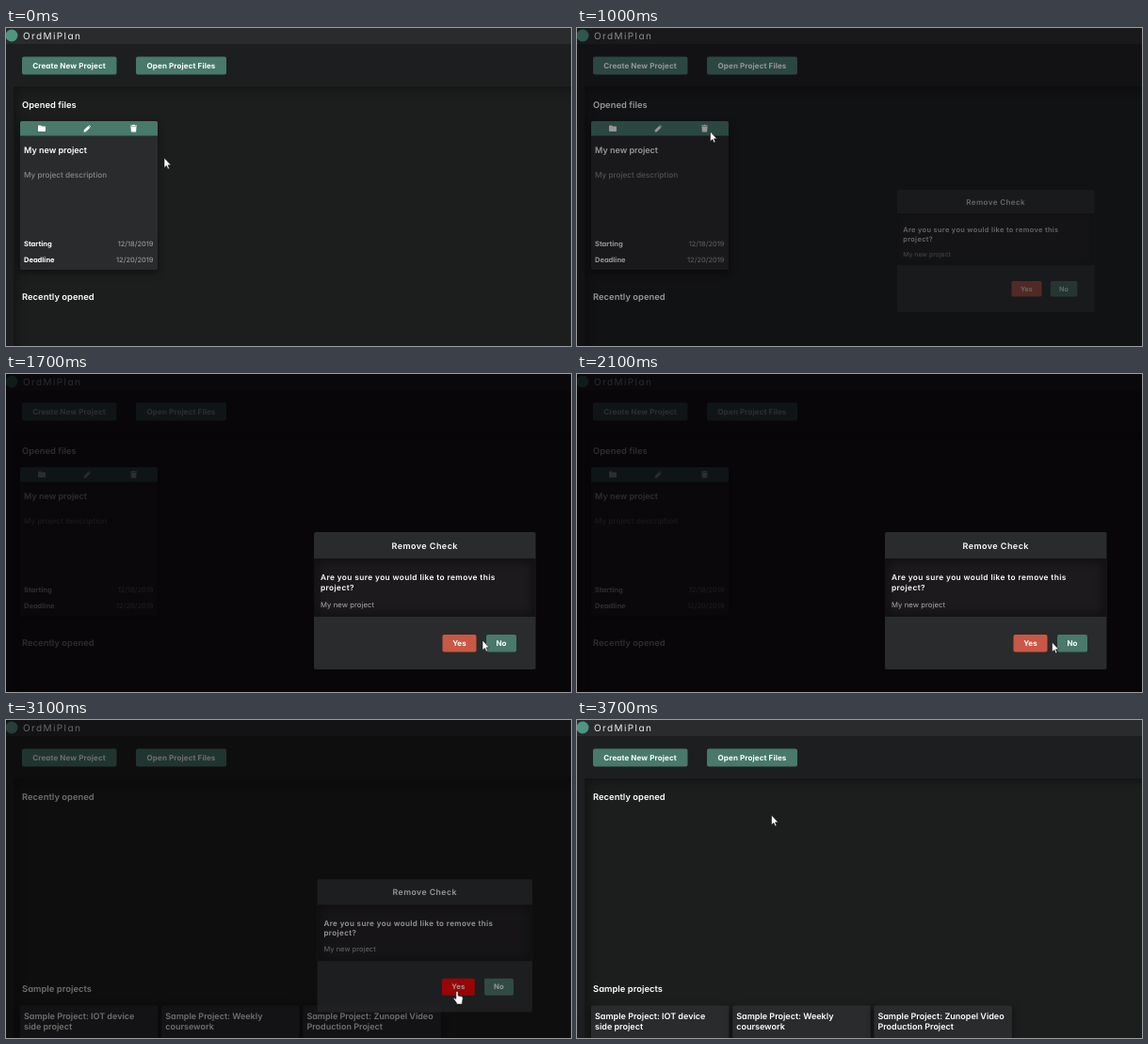
Write an HTML page that moves like this. It is 600 by 338 pixels and loops after 3800 ms.

```html
<!DOCTYPE html>
<html lang="en">
<head>
<meta charset="utf-8">
<title>Project board</title>
<style>
  html, body { margin: 0; width: 100%; height: 100%; overflow: hidden; background: #1d1e1f; }
  #stage { display: block; width: 100vw; height: 100vh; }
  text {
    font-family: Inter, "Open Sans", sans-serif;
    font-feature-settings: "cv11";
    text-rendering: geometricPrecision;
    fill: #fff;
  }
  .brand { font-size: 10px; letter-spacing: 1.4px; fill: #eee; }
  .btn { font-size: 8px; font-weight: 700; letter-spacing: .12px; text-anchor: middle; }
  .head { font-size: 9.35px; font-weight: 600; letter-spacing: .05px; }
  .name { font-size: 9px; font-weight: 600; }
  .desc { font-size: 8.2px; font-weight: 500; fill: #85898a; }
  .label { font-size: 7.5px; font-weight: 700; }
  .date { font-size: 7.4px; font-weight: 500; fill: #939697; text-anchor: end; }
  .title { font-size: 9px; font-weight: 600; letter-spacing: .45px; text-anchor: middle; }
  .ask { font-size: 8.3px; font-weight: 600; letter-spacing: .4px; }
  .note { font-size: 7.7px; letter-spacing: .06px; fill: #a9aaab; }
  .green { fill: #48796b; }
  .bar { fill: #292b2c; }
  .icon { fill: #fff; }
  .edge { fill: none; stroke: #000; filter: blur(5px); }
  .shade { fill: #000; opacity: .5; filter: blur(4px); }
</style>
</head>
<body>
<svg id="stage" viewBox="0 0 600 338" preserveAspectRatio="none">
  <rect width="600" height="338" fill="#1d1e1f"/>
  <svg x="8" y="62" width="592" height="276">
    <rect width="592" height="276" fill="#1c1e1e"/>
    <rect class="edge" width="620" height="310" stroke-width="9" opacity=".3"/>
  </svg>
  <rect class="bar" width="600" height="17"/>
  <circle cx="6" cy="8" r="6.5" fill="#4f9582"/>
  <text class="brand" x="18" y="12">OrdMiPlan</text>
  <rect class="green" x="17" y="30.5" width="100.5" height="19" rx="2"/>
  <text class="btn" x="67" y="43">Create New Project</text>
  <rect class="green" x="138" y="30.5" width="96" height="19" rx="2"/>
  <text class="btn" x="186" y="43">Open Project Files</text>

  <g id="before">
    <text class="head" x="17" y="85.4">Opened files</text>
    <rect class="shade" x="15" y="102" width="146" height="158"/>
    <rect id="card" x="15" y="99" width="146" height="158" rx="2"/>
    <path class="green" d="M15 114.5V101Q15 99 17 99H159Q161 99 161 101V114.5Z"/>
    <rect id="bin" x="112" y="99" width="49" height="15.5"/>
    <path class="icon" transform="translate(34 103)" d="M0 1.2Q0 .5 .8 .5H3L4 1.5H7.2Q8 1.5 8 2.3V6.2Q8 7 7.2 7H.8Q0 7 0 6.2Z"/>
    <path class="icon" transform="translate(82.7 103)" d="M0 7.5V5.6L4.6 1 6.5 2.9 1.9 7.5ZM5.1 .5 5.6 0 7.5 1.9 7 2.4Z"/>
    <path class="icon" transform="translate(132 102.5)" d="M0 1H2L2.5 .3H4.5L5 1H7V2H0ZM.5 2.6H6.5L6.1 8H.9Z"/>
    <text class="name" x="19" y="132.6">My new project</text>
    <text class="desc" x="19" y="159.4">My project description</text>
    <text class="label" x="19" y="232.3">Starting</text>
    <text class="date" x="156.5" y="232.3">12/18/2019</text>
    <text class="label" x="19" y="249.2">Deadline</text>
    <text class="date" x="156.5" y="249.2">12/20/2019</text>
    <text class="head" x="17" y="288.5">Recently opened</text>
  </g>

  <g id="after">
    <text class="head" x="17" y="85.4">Recently opened</text>
    <text class="head" x="17" y="289.4">Sample projects</text>
    <g id="samples"></g>
  </g>

  <rect id="veil" width="600" height="338" fill="#040205"/>

  <g id="modal">
    <rect class="bar" x="327" y="168" width="235.5" height="146" rx="2"/>
    <svg x="327" y="196" width="235.5" height="62">
      <rect width="235.5" height="62" fill="#1c1a1d"/>
      <rect class="edge" width="235.5" height="62" stroke-width="8" opacity=".45"/>
    </svg>
    <text class="title" x="444.7" y="185.5">Remove Check</text>
    <text class="ask" x="334" y="219">Are you sure you would like to remove this</text>
    <text class="ask" x="334" y="230">project?</text>
    <text class="note" x="334" y="247.8">My new project</text>
    <rect id="yes" x="463.5" y="277" width="36" height="18.5" rx="2"/>
    <text class="btn" x="481.5" y="288.8">Yes</text>
    <rect id="no" class="green" x="510" y="277" width="32" height="18.5" rx="2"/>
    <text class="btn" x="526" y="288.8">No</text>
  </g>

  <g id="cursor" fill="#fff" stroke="#111" stroke-width=".6" stroke-linejoin="round">
    <path id="arrow" d="M0 0V10.6L2.4 8.4 4 12 5.5 11.3 4 7.8H7.2Z"/>
    <path id="hand" d="M-1.1 1Q0 -.6 1.1 1V5L5 5.8Q6.4 6.2 6.2 8L5.4 12.5V14H-.6V12.6L-3.7 8.4Q-3.4 6.6 -1.1 8.4Z"/>
  </g>
</svg>
<script>
const LOOP = 3800, STEP = 100;
const OPEN = 800, REMOVE = 3000;
const $ = id => document.getElementById(id);

const samples = [
  ["Sample Project: IOT device", "side project"],
  ["Sample Project: Weekly", "coursework"],
  ["Sample Project: Zunopel Video", "Production Project"]
];
$("samples").innerHTML = samples.map(([a, b], i) => {
  const x = 15 + i * 150.2;
  return `
  <rect class="shade" x="${x}" y="306" width="146.5" height="50"/>
  <rect class="bar" x="${x}" y="303.5" width="146.5" height="50" rx="2"/>
  <text class="name" x="${x + 4}" y="317.6">${a}</text>
  <text class="name" x="${x + 4}" y="328.6">${b}</text>`;
}).join("");

// Where the pointer goes, one eased move after another.
const home = { x: 168, y: 138 };
const moves = [
  { from: 0, to: 500, x: 141.5, y: 110 },      // delete icon
  { from: 1100, to: 1700, x: 506, y: 283 },    // between the buttons
  { from: 1700, to: 1800, x: 521, y: 283 },    // No
  { from: 1800, to: 2500, x: 479, y: 288 },    // Yes
  { from: 3530, to: 3700, x: 206.5, y: 101 }   // away
];

function ease(t, from, to) {
  const k = Math.min(1, Math.max(0, (t - from) / (to - from)));
  return k * k * (3 - 2 * k);
}

function pointerAt(t) {
  let { x, y } = home;
  for (const m of moves) {
    const k = ease(t, m.from, m.to);
    x += (m.x - x) * k;
    y += (m.y - y) * k;
  }
  return { x, y };
}

function over(id, p) {
  const r = $(id);
  const dx = p.x - r.x.baseVal.value, dy = p.y - r.y.baseVal.value;
  return dx >= 0 && dy >= 0 && dx < r.width.baseVal.value && dy < r.height.baseVal.value;
}
const show = (id, on) => { $(id).style.display = on ? "" : "none"; };
const fill = (id, color) => $(id).setAttribute("fill", color);

function draw(t) {
  const p = pointerAt(t);
  const shown = ease(t, OPEN, OPEN + 400) - ease(t, REMOVE, REMOVE + 270);
  const removed = t >= REMOVE;
  const small = removed ? .9 : .78;
  const scale = small + (1 - small) * shown;

  const onPage = shown === 0 && !removed;
  const onBin = onPage && over("bin", p);
  const onYes = shown > 0 && over("yes", p);
  const onNo = shown > 0 && over("no", p);
  const hand = onBin || onYes || onNo;

  show("before", !removed);
  show("after", removed);
  fill("card", onPage && over("card", p) ? "#444748" : "#292b2c");
  fill("bin", onBin ? "#f00" : "none");
  fill("yes", onYes ? "#f00" : "#c95845");

  $("veil").setAttribute("opacity", .83 * shown);
  $("modal").setAttribute("opacity", shown ** 1.5);
  $("modal").setAttribute("transform",
    `translate(444.75 205) scale(${scale}) translate(-444.75 -205)`);

  $("cursor").setAttribute("transform", `translate(${p.x} ${p.y})`);
  show("hand", hand);
  show("arrow", !hand);
}

const start = performance.now();
function tick() {
  const t = (performance.now() - start) % LOOP;
  draw(Math.floor(t / STEP) * STEP);
  requestAnimationFrame(tick);
}
tick();
</script>
</body>
</html>
```
